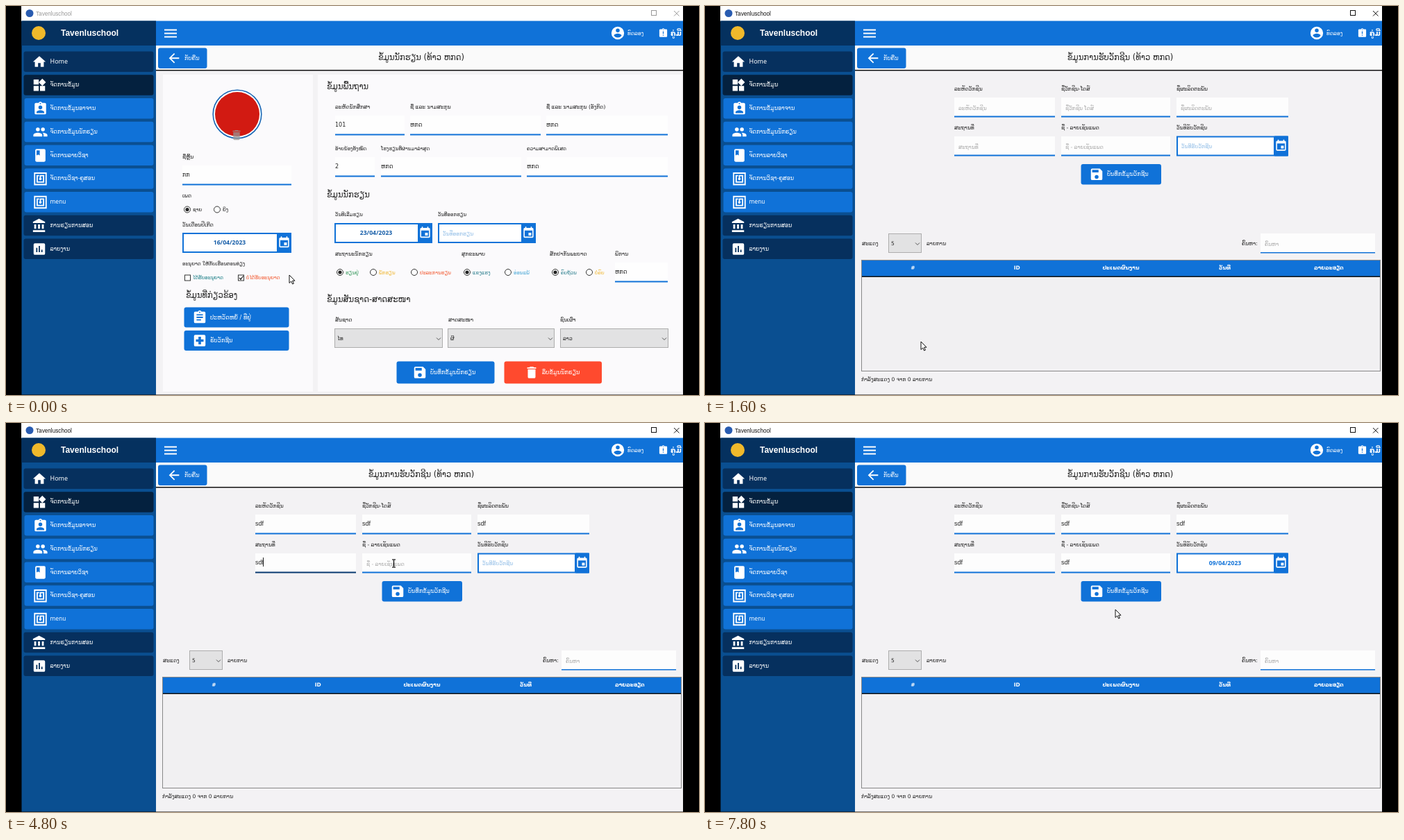
Recreate the animation shown at these times as an HTML page with a canvas. Size 998 by 561 pixels, loop 8 s.

```html
<!DOCTYPE html>
<html lang="lo">
<head>
<meta charset="utf-8">
<title>School records</title>
<style>
html, body { margin: 0; width: 100%; height: 100%; overflow: hidden; background: #000; }
canvas { display: block; width: 100vw; height: 100vh; }
</style>
</head>
<body>
<canvas id="stage" width="998" height="561"></canvas>
<script>
const ctx = document.getElementById('stage').getContext('2d');
const LOOP = 8000, STEP = 200;
const BLUE = '#1072d8', NAVY = '#06305e', INK = '#222', WHITE = '#fff', GREY = '#a9a9a9';
const APP = 'Tavenluschool';
const LAO = '"DejaVu Sans", sans-serif';
const LATIN = '"Liberation Sans", Arial, sans-serif';
const DIGITS = '"Noto Sans", sans-serif';
const LABEL = 7.5, SMALL = 7, HEADING = 11.5;

// Icons on a 24-unit grid, filled with the even-odd rule
const BOARD = 'M19 3h-4.2a3 3 0 00-5.6 0H5a2 2 0 00-2 2v14a2 2 0 002 2h14a2 2 0 002-2V5a2 2 0 00-2-2zM12 3a1 1 0 110 2 1 1 0 010-2z';
const TILE = 'M5 3h14a2 2 0 012 2v14a2 2 0 01-2 2H5a2 2 0 01-2-2V5a2 2 0 012-2z';
const ICONS = {
  home: 'M10 20v-6h4v6h5v-8h3L12 3 2 12h3v8z',
  widgets: 'M13 13v8h8v-8zM3 21h8v-8H3zM3 3v8h8V3zM16.7 1.7L11 7.3l5.7 5.7 5.6-5.7z',
  teacher: BOARD + 'M12 7a3 3 0 110 6 3 3 0 010-6zM18 19H6v-1.4c0-2 4-3.1 6-3.1s6 1.1 6 3.1z',
  people: 'M5 8a3 3 0 106 0 3 3 0 10-6 0M13 8a3 3 0 106 0 3 3 0 10-6 0M1 19v-2.5C1 14.2 5.7 13 8 13s7 1.2 7 3.5V19zM17 19v-2.5c0-1.5-.7-2.6-1.8-3.4 2.5 0 7.8 1.2 7.8 3.4V19z',
  book: 'M6 2h12a2 2 0 012 2v16a2 2 0 01-2 2H6a2 2 0 01-2-2V4a2 2 0 012-2zM6 4v8l2.5-1.5L11 12V4z',
  panel: 'M2 2h20v20H2zM4 4v16h16V4zM18 6h-7v4.3a2 2 0 102 0V8h3v8H8V8h2V6H6v12h12z',
  bank: 'M4 10v7h3v-7zM10 10v7h3v-7zM16 10v7h3v-7zM2 22h19v-3H2zM11.5 1L2 6v2h19V6z',
  chart: TILE + 'M7 10h2v7H7zM11 7h2v10h-2zM15 13h2v4h-2z',
  save: 'M17 3H5a2 2 0 00-2 2v14a2 2 0 002 2h14a2 2 0 002-2V7zM12 19a3 3 0 110-6 3 3 0 010 6zM15 9H5V5h10z',
  bin: 'M6 19a2 2 0 002 2h8a2 2 0 002-2V7H6zM19 4h-3.5l-1-1h-5l-1 1H5v2h14z',
  date: 'M19 3h-1V1h-2v2H8V1H6v2H5a2 2 0 00-2 2v14a2 2 0 002 2h14a2 2 0 002-2V5a2 2 0 00-2-2zM19 19H5V8h14zM17 12h-5v5h5z',
  user: 'M2 12a10 10 0 1020 0 10 10 0 10-20 0M12 5a3 3 0 110 6 3 3 0 010-6M12 19.2a7.2 7.2 0 01-6-3.2c0-2 4-3.1 6-3.1s6 1.1 6 3.1a7.2 7.2 0 01-6 3.2z',
  alert: BOARD + 'M11 8h2v6h-2zM11 16h2v2h-2z',
  list: BOARD + 'M7 7h10v2H7zM7 11h10v2H7zM7 15h7v2H7z',
  cross: TILE + 'M18 14h-4v4h-4v-4H6v-4h4V6h4v4h4z',
  back: 'M20 11H7.8l5.6-5.6L12 4l-8 8 8 8 1.4-1.4L7.8 13H20z',
  menu: 'M3 18h18v-2H3zM3 13h18v-2H3zM3 8h18V6H3z'
};
for (const k in ICONS) ICONS[k] = new Path2D(ICONS[k]);

const ARROW = new Path2D('M0 0V11.5L2.7 9l1.9 4 1.8-.8L4.6 8.2H8z');
const HAND = new Path2D('M-1.2 1a1.2 1.2 0 012.4 0V5.5l4.6 1.2q1.2.4 1.1 2L6 14H0L-4.2 9q-.4-1.5 1-1.5l2 1.5z');

function rect(x, y, w, h, color, r = 0) {
  ctx.fillStyle = color;
  ctx.beginPath();
  ctx.roundRect(x, y, w, h, r);
  ctx.fill();
}
function frame(x, y, w, h, color, lw = 1) {
  ctx.strokeStyle = color;
  ctx.lineWidth = lw;
  ctx.strokeRect(x + lw / 2, y + lw / 2, w - lw, h - lw);
}
function line(color, lw, ...pts) {
  ctx.strokeStyle = color;
  ctx.lineWidth = lw;
  ctx.beginPath();
  for (let i = 0; i < pts.length; i += 2) ctx.lineTo(pts[i], pts[i + 1]);
  ctx.stroke();
}
function disc(x, y, r, color) {
  ctx.fillStyle = color;
  ctx.beginPath();
  ctx.arc(x, y, r, 0, 7);
  ctx.fill();
}
function ring(x, y, r, color, lw) {
  ctx.strokeStyle = color;
  ctx.lineWidth = lw;
  ctx.beginPath();
  ctx.arc(x, y, r, 0, 7);
  ctx.stroke();
}
function text(s, x, y, size = LABEL, color = INK, align = 'left', bold = false, family = LAO) {
  ctx.font = `${bold ? 'bold ' : ''}${size}px ${family}`;
  ctx.textAlign = align;
  ctx.fillStyle = color;
  ctx.fillText(s, x, y);
}
function icon(name, cx, cy, size, color = WHITE) {
  ctx.save();
  ctx.translate(cx - size / 2, cy - size / 2);
  ctx.scale(size / 24, size / 24);
  ctx.fillStyle = color;
  ctx.fill(ICONS[name], 'evenodd');
  ctx.restore();
}
function button(b, mouse) {
  const [x, y, w, h, name, label, color, dx] = b;
  rect(x, y, w, h, mouse && inside(mouse, b) ? '#04489f' : color, 3);
  icon(name, x + dx, y + h / 2, 22);
  text(label, x + dx + 15, y + h / 2 + 2.5, 8.2, WHITE);
}
function inside(m, [x, y, w, h]) {
  return m.x >= x && m.x <= x + w && m.y >= y && m.y <= y + h;
}
function chevron(x, y) {
  line('#555', 1, x - 3, y - 1.5, x, y + 1.5, x + 3, y - 1.5);
}
function select(x, y, w, h, value) {
  rect(x, y, w, h, '#e2e2e3');
  frame(x, y, w, h, '#adadad');
  text(value, x + 4, y + h / 2 + 2.5);
  chevron(x + w - 6, y + h / 2 + 1);
}
function underlined(x, y, w, value) {
  rect(x, y - 27, w, 27, '#fefefe');
  rect(x, y - .5, w, 2, BLUE);
  text(value, x, y - 11, 8);
}
function dateBox(x, y, w, value, empty, color = '#155da8') {
  rect(x, y, w, 29, WHITE);
  frame(x, y, w, 29, BLUE, 2);
  rect(x + w - 21, y, 21, 29, BLUE, 2);
  icon('date', x + w - 10.5, y + 14, 19);
  if (value) text(value, x + (w - 21) / 2, y + 17, 8.6, color, 'center', true, DIGITS);
  else text(empty, x + 7, y + 17.5, LABEL, '#8fbce6');
}
function radio(x, y, on, label, color) {
  disc(x, y, 4.5, WHITE);
  ring(x, y, 4.5, '#333', 1);
  if (on) disc(x, y, 2.6, '#222');
  text(label, x + 8, y + 2.5, SMALL, color);
}
function check(x, y, on, label, color) {
  rect(x, y, 9, 9, WHITE);
  frame(x, y, 9, 9, '#333');
  if (on) line('#222', 1.2, x + 2, y + 4.5, x + 4, y + 6.7, x + 7.5, y + 2);
  text(label, x + 12, y + 6.5, SMALL, color);
}

const MENU = [
  ['home', 'Home', NAVY], ['widgets', 'ຈັດການຂໍ້ມູນ', '#04213f'],
  ['teacher', 'ຈັດການຂໍ້ມູນອາຈານ', BLUE], ['people', 'ຈັດການຂໍ້ມູນນັກຮຽນ', BLUE],
  ['book', 'ຈັດການລາຍວິຊາ', BLUE], ['panel', 'ຈັດການວິຊາ-ຄູສອນ', BLUE],
  ['panel', 'menu', BLUE], ['bank', 'ການຮຽນການສອນ', NAVY], ['chart', 'ລາຍງານ', NAVY]
];

function shell(active, title) {
  rect(0, 0, 998, 561, '#000');
  rect(22, 0, 953, 22, WHITE);
  const ink = active ? '#111' : '#999';
  disc(34, 10.5, 5.5, '#285bb0');
  text(APP, 43, 14, 8.2, ink, 'left', false, LATIN);
  frame(929, 6, 8, 8, ink);
  line(ink, 1, 962, 7, 969.5, 14.5);
  line(ink, 1, 969.5, 7, 962, 14.5);

  rect(22.5, 21.5, 193.5, 539, '#0a4f91');
  rect(22.5, 21.5, 193.5, 35.5, '#05315f');
  disc(47, 39, 10, '#f0b92b');
  text(APP, 79, 43, 12, WHITE, 'left', true, LATIN);
  MENU.forEach(([name, label, color], i) => {
    const y = 66 + i * 33.75, sub = color === BLUE;
    rect(sub ? 26.5 : 25.5, y - .5, sub ? 186 : 187, 29.5, color, 3);
    icon(name, sub ? 49.5 : 48, y + 14.5, 22);
    text(label, 63.5, y + 16.5, i ? 8 : 9, WHITE, 'left', false, i ? LAO : DIGITS);
  });

  rect(216, 21.5, 759, 35.5, BLUE);
  icon('menu', 237, 39.5, 24);
  icon('user', 881, 39, 22);
  text('ທົດລອງ', 895, 41.5, 7.6, WHITE);
  icon('alert', 946.5, 39, 15);
  text('ຄູ່ມື', 957, 43, 10, WHITE, 'left', true);
  rect(216, 57, 759, 503.5, '#f3f2f4');
  rect(216, 57, 759, 35, '#fafafa');
  rect(216, 92, 759, 1.5, '#111');
  button([219, 60.5, 70.5, 29.5, 'back', 'ກັບຄືນ', BLUE, 23]);
  text(title, 598, 78, HEADING, INK, 'center');
}

const STUDENT_BUTTONS = [
  [256.5, 434.5, 151, 29, 'list', 'ປະຫວັດຫຍໍ້ / ທີ່ຢູ່', BLUE, 22.5],
  [256.5, 468, 151, 29, 'cross', 'ຮັບວັກຊີນ', BLUE, 22.5],
  [562.5, 512.5, 141, 32, 'save', 'ບັນທຶກຂໍ້ມູນນັກຮຽນ', BLUE, 33.5],
  [717.5, 512.5, 140.5, 32, 'bin', 'ລຶບຂໍ້ມູນນັກຮຽນ', '#ff4a2e', 39.5]
];

function studentPage(m) {
  rect(226, 99, 216, 457, '#fbfafc');
  rect(449, 99, 524, 457, '#fbfafc');

  disc(333, 156, 35, WHITE);
  disc(333, 156, 32, '#d21a12');
  ring(333, 156, 34.8, '#1766b5', 1.6);
  icon('bin', 332, 186, 19, 'rgba(150,150,150,.75)');
  text('ຊື່ຫຼິ້ນ', 254, 220);
  underlined(254, 257, 157, 'ກກ');
  text('ເພດ', 254, 276);
  radio(261, 293.5, true, 'ຊາຍ');
  radio(304, 293.5, false, 'ຍິງ');
  text('ວັນເດືອນປີເກີດ', 254, 318);
  dateBox(254, 327, 157, '16/04/2023');
  text('ອະນຸຍາດ ໃຫ້ກັບເຮືອນຕອນທ່ຽງ', 254, 374, SMALL);
  check(257, 387.5, false, 'ໄດ້ຮັບອະນຸຍາດ', '#147a83');
  check(334, 387.5, true, 'ບໍ່ໄດ້ຮັບອະນຸຍາດ', '#f2562c');
  text('ຂໍ້ມູນທີ່ກ່ຽວຂ້ອງ', 259, 421, HEADING);

  text('ຂໍ້ມູນພື້ນຖານ', 462, 120, HEADING);
  text('ລະຫັດນັກສຶກສາ', 474, 148);
  text('ຊື່ ແລະ ນາມສະກຸນ', 582, 148);
  text('ຊື່ ແລະ ນາມສະກຸນ (ອັງກິດ)', 778, 148);
  underlined(474, 185, 100, '101');
  underlined(582, 185, 188, 'ຫກດ');
  underlined(778, 185, 175, 'ຫກດ');
  text('ອ້າຍນ້ອງທັງໝົດ', 474, 208, SMALL);
  text('ໂຮງຮຽນທີ່ຜ່ານມາລ່າສຸດ', 540, 208, SMALL);
  text('ຄວາມສາມາດພິເສດ', 750, 208, SMALL);
  underlined(474, 245, 57, '2');
  underlined(540, 245, 202, 'ຫກດ');
  underlined(750, 245, 203, 'ຫກດ');

  text('ຂໍ້ມູນນັກຮຽນ', 462, 276, HEADING);
  text('ວັນທີເລີ່ມຮຽນ', 474, 303, SMALL);
  text('ວັນທີ່ອອກຮຽນ', 622, 303, SMALL);
  dateBox(473, 313, 141, '23/04/2023');
  dateBox(622, 313, 141, '', 'ວັນທີ່ອອກຮຽນ');
  text('ສະຖານະນັກຮຽນ', 474, 360);
  text('ສຸກຂະພາບ', 656, 360);
  text('ສັກຢາກັນພະຍາດ', 783, 360);
  text('ພິການ', 877, 360);
  radio(481, 384, true, 'ຮຽນຢູ່', '#2d9455');
  radio(529, 384, false, 'ພັກຮຽນ', '#efb52c');
  radio(588, 384, false, 'ປະລະການຮຽນ', '#f2562c');
  radio(664, 384, true, 'ແຂງແຮງ', '#287d8c');
  radio(723, 384, false, 'ອ່ອນແພ້', '#43a5d5');
  radio(791, 384, true, 'ຄົບຖ້ວນ', '#287d8c');
  radio(840, 384, false, 'ບໍ່ຄົບ', '#efb52c');
  underlined(877, 397, 76, 'ຫກດ');

  text('ຂໍ້ມູນສັນຊາດ-ສາດສະໜາ', 462, 427, HEADING);
  text('ສັນຊາດ', 474, 455);
  text('ສາດສະໜາ', 637, 455);
  text('ຊົນເຜົ່າ', 798, 455);
  select(473, 465, 156, 28, 'ໄທ');
  select(636, 465, 154, 28, 'ຜີ');
  select(798, 465, 156, 28, 'ລາວ');
  STUDENT_BUTTONS.forEach(b => button(b, m));
}

// x, y, width, label, hint, focus time, ms per letter
const FIELDS = [
  [359, 132, 145, 'ລະຫັດວັກຊີນ', 'ລະຫັດວັກຊີນ', 2200, 200],
  [513, 132, 157, 'ຊື່ວັກຊີນ-ໂດສ໌', 'ຊື່ວັກຊີນ ໂດສ໌', 3200, 200],
  [679, 132, 161, 'ຊື່ຜະລິດຕະພັນ', 'ຊື່ຜະລິດຕະພັນ', 3800, 100],
  [359, 188, 145, 'ສະຖານທີ່', 'ສະຖານທີ່', 4400, 130],
  [513, 188, 157, 'ຊື່ - ລາຍເຊັນແພດ', 'ຊື່ - ລາຍເຊັນແພດ', 5000, 130]
];
const SAVE = [541.5, 228, 115.5, 29.5, 'save', 'ບັນທຶກຂໍ້ມູນວັກຊີນ', BLUE, 22.5];
const OPEN = 5800, PICKED = 6800;

function field([x, y, w, label, hint, start, pace], t, end) {
  const focus = t >= start && t < end;
  const typed = 'sdf'.slice(0, Math.max(0, Math.floor((t - start) / pace)));
  text(label, x, y - 10.5);
  rect(x, y, w, 28, '#fdfdfd');
  rect(x, y + 26.5, w, 2, focus ? '#083a70' : BLUE);
  if (!typed && !focus) text(hint, x + 6, y + 17.5, LABEL, GREY);
  text(typed, x, y + 16, 9, INK, 'left', false, LATIN);
  if (focus) rect(x + Math.round(ctx.measureText(typed).width) - 1, y + 6, 1, 13, INK);
}

function vaccinePage(t, m) {
  FIELDS.forEach((f, i) => field(f, t, FIELDS[i + 1] ? FIELDS[i + 1][5] : 5600));
  text('ວັນທີຮັບວັກຊີນ', 679, 177.5);
  dateBox(679, 187.5, 161, t >= PICKED ? '09/04/2023' : '', 'ວັນທີຮັບວັກຊີນ', BLUE);
  button(SAVE, m);

  text('ສະແດງ', 226, 344.5);
  select(264, 328, 48, 28, '5');
  text('ລາຍການ', 319, 344.5);
  text('ຄົ້ນຫາ:', 773, 344.5);
  rect(800, 328, 165, 28, '#fdfdfd');
  rect(800, 355, 165, 1.5, BLUE);
  text('ຄົ້ນຫາ', 806, 345.5, LABEL, GREY);

  rect(225, 366, 748, 160, '#f1f0f2');
  rect(225, 366, 748, 24, BLUE);
  rect(225, 389.5, 748, 1.5, '#111');
  frame(225, 366, 748, 161, '#888');
  ['#', 'ID', 'ປະເພດຜົນງານ', 'ວັນທີ່', 'ລາຍລະອຽດ'].forEach((s, i) =>
    text(s, 299.5 + i * 149.7, 380, LABEL, WHITE, 'center', true));
  text('ກຳລັງສະແດງ 0 ຈາກ 0 ລາຍການ', 225, 541);
  if (t >= OPEN && t < PICKED) calendar();
}

function calendar() {
  ctx.save();
  ctx.beginPath();
  ctx.rect(22, 0, 953, 561);
  ctx.clip();
  rect(825, 204, 224, 244, '#8b8b8b');
  rect(826, 205.5, 222, 241, BLUE);
  rect(828, 207, 218, 237, WHITE);
  rect(832, 215, 32, 20, BLUE, 2);
  line(WHITE, 2, 850.5, 220, 845.5, 225, 850.5, 230);
  text('ເມສາ', 934, 228, 8.5, INK, 'center', true);
  rect(828, 240, 218, 35, BLUE);
  ['ຈັນ', 'ອັງຄານ', 'ພຸດ', 'ພະຫັດ', 'ສຸກ'].forEach((s, i) =>
    text(s, 843.5 + i * 31, 261, 8, WHITE, 'center', true));
  const top = 275, rowH = 21.1;
  rect(828, top + 5 * rowH, 31, rowH, BLUE);
  for (let r = 0; r <= 6; r++) rect(828, Math.round(top + r * rowH), 218, 1, '#888');
  for (let c = 0; c < 6; c++) rect(827.5 + c * 31, top, 1, rowH * 6, '#888');
  for (let r = 1; r < 6; r++) for (let c = 0; c < 5; c++) {
    const day = 2 + (r - 1) * 7 + c;
    if (day <= 30) text(day, 843.5 + c * 31, top + r * rowH + 14, 10, day === 30 ? WHITE : '#111', 'center', true, DIGITS);
  }
  text('ເລືອກປີ', 835, 424, 8.2);
  frame(938, 407, 58, 29, '#174f9c', 2);
  text('2023', 968, 424, 9, '#174f9c', 'center', true, DIGITS);
  ctx.restore();
}

const PATH = [
  [0, 408, 388], [1200, 311, 484], [1600, 311, 484], [2200, 425, 146], [2600, 425, 146],
  [3200, 585, 148], [3600, 720, 149], [3800, 720, 149], [4400, 425, 202], [4800, 558.5, 202.5],
  [5000, 558.5, 202.5], [5600, 825, 203], [5800, 825, 203], [6400, 843, 325], [6600, 843, 325], [7800, 591, 269]
];
function mouseAt(t) {
  const i = PATH.findIndex(p => p[0] > t);
  if (i < 0) return { x: 591, y: 269 };
  const [t0, x0, y0] = PATH[i - 1], [t1, x1, y1] = PATH[i];
  const u = (t - t0) / (t1 - t0), e = u * u * (3 - 2 * u);
  return { x: x0 + (x1 - x0) * e, y: y0 + (y1 - y0) * e };
}

function pointer(m, t, student) {
  const popup = t >= OPEN && t < PICKED;
  const hot = student ? STUDENT_BUTTONS : [SAVE];
  const inputs = student ? [] : FIELDS.map(f => [f[0], f[1], f[2], 28]).concat([[679, 188, 139, 28]]);
  ctx.save();
  ctx.translate(m.x, m.y);
  if (!popup && inputs.some(b => inside(m, b))) {
    line('#111', 1.3, 0, -5, 0, 5);
    line('#111', 1.2, -2.5, -5.5, 2.5, -5.5);
    line('#111', 1.2, -2.5, 5.5, 2.5, 5.5);
  } else {
    const shape = hot.some(b => inside(m, b)) ? HAND : ARROW;
    ctx.fillStyle = WHITE;
    ctx.strokeStyle = '#111';
    ctx.lineWidth = 1;
    ctx.fill(shape);
    ctx.stroke(shape);
  }
  ctx.restore();
}

function draw(now) {
  const t = Math.floor(now % LOOP / STEP) * STEP;
  const m = mouseAt(t), student = t < 1600;
  shell(t >= 200, student ? 'ຂໍ້ມູນນັກຮຽນ (ທ້າວ ຫກດ)' : 'ຂໍ້ມູນການຮັບວັກຊີນ (ທ້າວ ຫກດ)');
  if (student) studentPage(m);
  else vaccinePage(t, m);
  pointer(m, t, student);
}

const begin = performance.now();
function tick() {
  draw(performance.now() - begin);
  requestAnimationFrame(tick);
}
tick();
</script>
</body>
</html>
```
